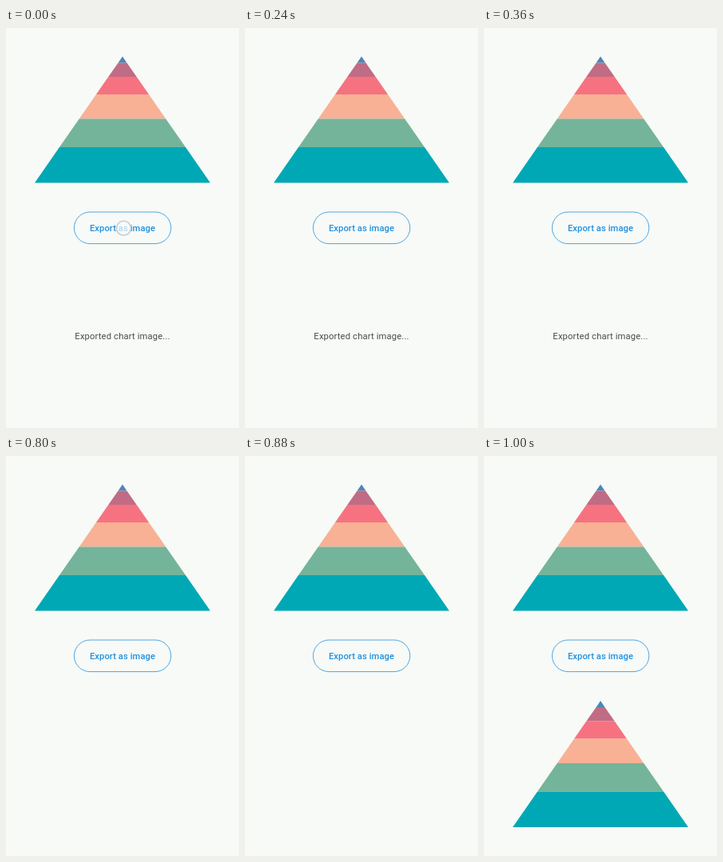
Recreate the animation shown at these times as an HTML page. Size 292 px wide and 500 px high, loop 1960 ms.

```html
<!DOCTYPE html>
<html lang="en">
<head>
<meta charset="utf-8">
<title>Export chart</title>
<style>
  html, body { margin: 0; width: 100%; height: 100%; overflow: hidden; background: #f7faf7; }
  svg { display: block; width: 100%; height: 100%; }
  text { font-family: Roboto, sans-serif; font-size: 11.2px; text-anchor: middle; }
  .label { font-weight: 500; fill: #2190e0; letter-spacing: .08px; }
  .status { fill: #494b49; letter-spacing: .16px; }
</style>
</head>
<body>
<svg viewBox="0 0 292 500">
  <rect width="292" height="500" fill="#f7faf7"/>
  <g id="chart"></g>
  <rect x="85.4" y="230" width="121.4" height="39.6" rx="19.8" fill="none" stroke="#3b9cdf" stroke-width=".9"/>
  <text class="label" x="146" y="254">Export as image</text>
  <g id="touch">
    <circle cx="147.5" cy="250.3" r="9" fill="#f7faf7" fill-opacity=".68"/>
    <circle cx="147.5" cy="250.3" r="9" fill="none" stroke="#c3cdd1" stroke-width="1.6"/>
  </g>
  <text id="status" class="status" x="146" y="389">Exported chart image...</text>
  <use id="exported" href="#chart" y="270.5"/>
</svg>
<script>
  const LOOP = 1960, FADE_START = 40, FADE_END = 200, STATUS_END = 800, EXPORT_START = 920;
  const APEX = { x: 146, y: 35.6 }, BASE = 193.4, HALF_WIDTH = 110;
  const bands = [
    [43.4, '#4b87b9'], [61, '#c06c84'], [83, '#f67280'],
    [113.4, '#f8b195'], [149, '#74b49b'], [BASE, '#00a8b5']
  ];
  const byId = id => document.getElementById(id);
  const touch = byId('touch'), status = byId('status'), exported = byId('exported');

  function drawPyramid() {
    const half = y => HALF_WIDTH * (y - APEX.y) / (BASE - APEX.y);
    let top = APEX.y;
    for (const [bottom, color] of bands) {
      const band = document.createElementNS('http://www.w3.org/2000/svg', 'path');
      const a = half(top), b = half(bottom);
      band.setAttribute('d', `M${APEX.x - a} ${top}H${APEX.x + a}L${APEX.x + b} ${bottom}H${APEX.x - b}Z`);
      band.setAttribute('fill', color);
      byId('chart').append(band);
      top = bottom;
    }
  }

  function render(t) {
    const fade = (FADE_END - t) / (FADE_END - FADE_START);
    touch.setAttribute('opacity', Math.max(0, Math.min(1, fade)));
    status.setAttribute('visibility', t < STATUS_END ? 'visible' : 'hidden');
    exported.setAttribute('visibility', t < EXPORT_START ? 'hidden' : 'visible');
  }

  const start = performance.now();
  function tick() {
    render((performance.now() - start) % LOOP);
    requestAnimationFrame(tick);
  }
  drawPyramid();
  render(0);
  requestAnimationFrame(tick);
</script>
</body>
</html>
```
